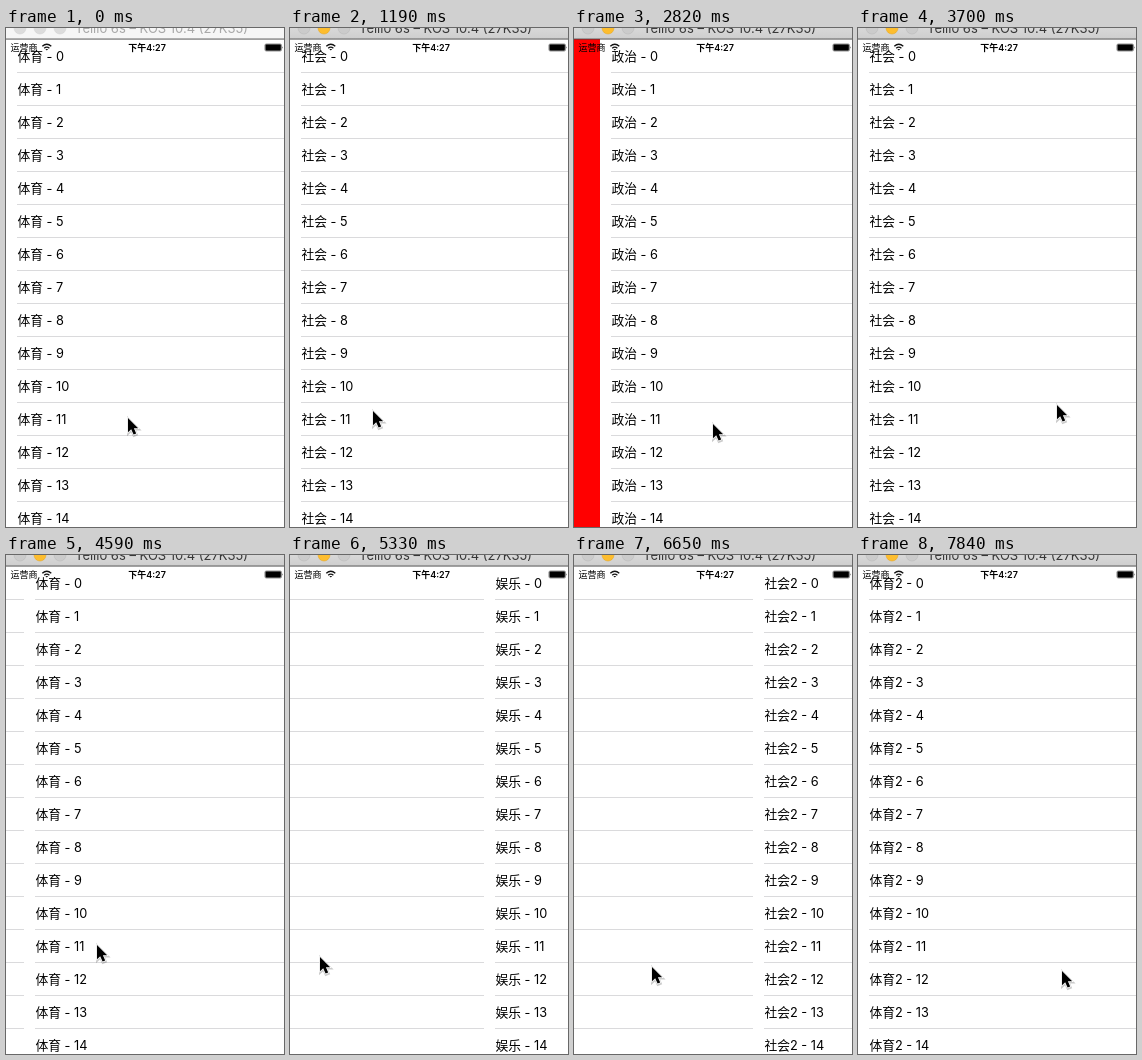
An HTML page for the animation above (7990 ms loop, 278 px wide and 499 px high).

```html
<!DOCTYPE html>
<html lang="zh-CN">
<head>
<meta charset="utf-8">
<title>Swiping between lists</title>
<style>
html, body { margin: 0; width: 100%; height: 100%; overflow: hidden; background: #fff; }
svg { display: block; width: 278px; height: 499px; }
text { font-family: Inter, "Noto Sans CJK SC", "Noto Sans CJK", sans-serif; }
.row { font-size: 12.75px; fill: #000; white-space: pre; }
.status { font-size: 9px; fill: #000; }
.title { font-size: 13px; }
</style>
</head>
<body>
<svg viewBox="0 0 278 499">
  <defs>
    <linearGradient id="shine" x1="0" y1="0" x2="0" y2="1">
      <stop offset="0" stop-color="#d8d8d8"/>
      <stop offset="1" stop-color="#cecece"/>
    </linearGradient>
    <path id="arrow" d="M0 0V14.2L3.2 11.2L5.6 16.6L8.2 15.5L5.9 10.2H10.2Z"/>
  </defs>
  <rect width="278" height="499" fill="#f00"/>
  <g id="pages"></g>
  <g id="status">
    <text class="status" x="4.5" y="22.5">运营商</text>
    <path d="M36.3 18.2Q40.8 14.3 45.3 18.2M38.2 20.2Q40.8 18 43.4 20.2" fill="none" stroke="#111" stroke-width="1.3"/>
    <path d="M39.4 21L40.8 22.6L42.2 21Z" fill="#111"/>
    <text class="status" x="141" y="22.5" text-anchor="middle" font-weight="600">下午4:27</text>
    <rect x="258.9" y="15.9" width="16.6" height="7.2" rx="1.4" fill="#aaa" stroke="#666" stroke-width=".6"/>
    <rect x="259.6" y="16.6" width="15.2" height="5.8" rx=".8" fill="#000"/>
    <path d="M276.3 18.2Q277.5 19.5 276.3 20.8Z" fill="#222"/>
  </g>
  <rect id="bar" width="278" height="11"/>
  <rect y="10.6" width="278" height=".9" fill="#444"/>
  <g id="dots" stroke-width=".6">
    <circle cx="14" r="6"/><circle cx="34" r="6"/><circle cx="54" r="6"/>
  </g>
  <text id="title" class="title" x="69" y="5">Tellio 6s – KOS 10.4 (27K35)</text>
  <g id="cursor">
    <use href="#arrow" x=".3" y="1" stroke="#000" stroke-width="2.6" opacity=".2"/>
    <use href="#arrow" stroke="#fff" stroke-width="1.4"/>
    <use href="#arrow"/>
  </g>
</svg>
<script>
const W = 281, ROW = 33, ROWS = 15;
const STEP = 147.96, STEPS = 54, LOOP = 7990, SETTLE = 4;
const names = ["政治", "社会", "体育", "娱乐", "社会2", "体育2"];
const $ = id => document.getElementById(id);

// Each drag runs from press to release (in steps), x0 to x1, and lands on page `to`.
const drags = [
  { press: 1, release: 3, x0: 122, x1: 215, y: 390, to: 1 },
  { press: 9, release: 11, x0: 83, x1: 204, y: 383, to: 0 },
  { press: 14, release: 17, x0: 87, x1: 195, y: 396, to: 0 },
  { press: 17, release: 21, x0: 195, x1: 83, y: 396, to: 1 },
  { press: 28, release: 29, x0: 199, x1: 64, y: 377, to: 2 },
  { press: 35, release: 36, x0: 117, x1: 30, y: 402, to: 3 },
  { press: 44, release: 45, x0: 180, x1: 78, y: 412, to: 4 },
  { press: 48, release: 49, x0: 190, x1: 75, y: 416, to: 5 }
];
const end = { press: STEPS, x0: 204, y: 416 };

const clamp = u => Math.max(0, Math.min(1, u));
const mix = (a, b, u) => a + (b - a) * u;
const easeOut = u => 1 - (1 - u) ** 3;
const easeInOut = u => u * u * (3 - 2 * u);
const rubber = pos => pos < 0 ? pos / 2 : pos;

// A drag that follows at once picks up the page where the last one left it.
let base = 2 * W;
drags.forEach((d, i) => {
  d.next = drags[i + 1] || end;
  d.rest = Math.min(SETTLE, d.next.press - d.release);
  d.base = base;
  d.dropped = base + d.x0 - d.x1;
  base = d.rest ? d.to * W : d.dropped;
});

function pose(step) {
  const d = drags.findLast(d => d.press <= step) || drags[0];
  if (step <= d.release) {
    const x = mix(d.x0, d.x1, clamp((step - d.press) / (d.release - d.press)));
    return { x, y: d.y, scroll: rubber(d.base + d.x0 - x) };
  }
  const u = clamp((step - d.release) / d.rest);
  return {
    x: mix(d.x1, d.next.x0, easeInOut(u)),
    y: mix(d.y, d.next.y, easeInOut(u)),
    scroll: mix(rubber(d.dropped), d.to * W, easeOut(u))
  };
}

function pageMarkup(name, n) {
  let out = `<g transform="translate(${n * W} 0)"><rect width="${W}" height="499" fill="#fff"/>`;
  for (let i = 0; i < ROWS; i++) {
    const y = 11 + i * ROW;
    out += `<text class="row" x="11.5" y="${y + 21.5}">${name} - ${i}</text>`
      + `<rect x="11" y="${y + ROW}" width="${W - 11}" height="1" fill="#dadadc"/>`;
  }
  return out + "</g>";
}

function paintWindow(active) {
  $("bar").setAttribute("fill", active ? "url(#shine)" : "#f6f6f6");
  $("title").setAttribute("fill", active ? "#383838" : "#a8a8a8");
  [...$("dots").children].forEach((dot, i) => {
    const lit = active && i === 1;
    dot.setAttribute("fill", lit ? "#fdbd2e" : active ? "#cbcbcb" : "#dcdcdc");
    dot.setAttribute("stroke", lit ? "#e6a92a" : active ? "#bbb" : "#d4d4d4");
  });
}

const move = (el, x, y) => el.setAttribute("transform", `translate(${Math.round(x)} ${Math.round(y)})`);

function draw(time) {
  const step = Math.min(STEPS - 1, Math.floor((time % LOOP + 11) / STEP));
  const { x, y, scroll } = pose(step);
  move($("pages"), -scroll, 0);
  move($("cursor"), x, y);
  paintWindow(step > 0);
}

$("pages").innerHTML = names.map(pageMarkup).join("");
const start = performance.now();
function tick() {
  draw(performance.now() - start);
  requestAnimationFrame(tick);
}
tick();
</script>
</body>
</html>
```
